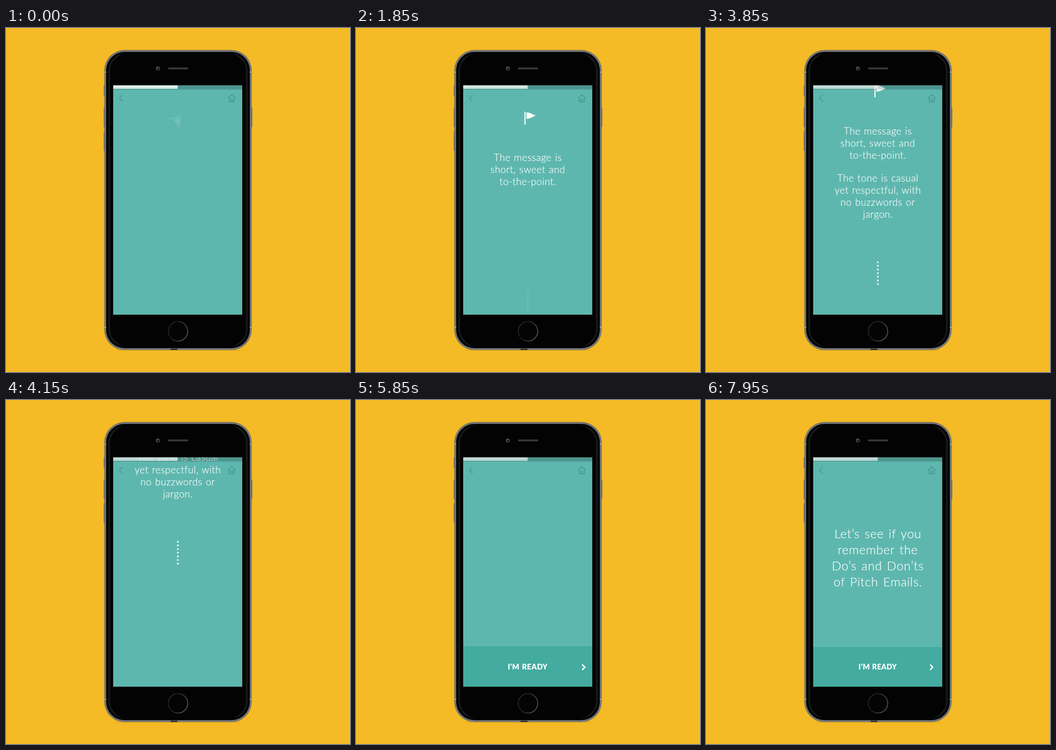
Write an HTML page that moves like this. It is 600 px wide and 600 px high and loops after 8 s.

```html
<!DOCTYPE html>
<html lang="en">
<head>
<meta charset="utf-8">
<title>Lesson screen</title>
<style>
html, body { margin: 0; width: 100%; height: 100%; overflow: hidden; background: #f4bb26; }
svg { display: block; width: 100vw; height: 100vh; }
text { font-family: Lato, "Open Sans", sans-serif; fill: #fff; text-anchor: middle; }
.body, .head { font-weight: 300; stroke: #fff; stroke-width: .2; }
.body { font-size: 17px; letter-spacing: .42px; word-spacing: 1px; }
.head { font-size: 21.5px; letter-spacing: .6px; word-spacing: 2px; }
.label { font-size: 12.5px; font-weight: 900; letter-spacing: .3px; word-spacing: 1px; }
.icon { fill: none; stroke: #43958c; stroke-width: 1.2; }
</style>
</head>
<body>
<svg viewBox="0 0 600 600">
  <defs>
    <clipPath id="screen"><rect x="187" y="100" width="225" height="400"/></clipPath>
    <linearGradient id="ring" x1="0" x2="1" y1="0" y2=".4">
      <stop offset="0" stop-color="#3a3b3c"/>
      <stop offset=".4" stop-color="#1c1d1e"/>
      <stop offset="1" stop-color="#5c5d5f"/>
    </linearGradient>
  </defs>
  <rect width="600" height="600" fill="#f4bb26"/>

  <g id="phone">
    <rect x="192" y="561" width="216" height="1.5" rx=".7" fill="#a87d12" opacity=".3"/>
    <g fill="#77767a">
      <rect x="170.4" y="100" width="2" height="18.5" rx=".8"/>
      <rect x="170.4" y="138.5" width="2" height="34.5" rx=".8"/>
      <rect x="170.4" y="180" width="2" height="34.5" rx=".8"/>
      <rect x="427.6" y="138.5" width="2" height="34.5" rx=".8"/>
    </g>
    <rect x="171.6" y="38.6" width="256.8" height="523" rx="35" fill="#55565a"/>
    <rect x="173.2" y="40.2" width="253.6" height="519.8" rx="33.5" fill="none" stroke="#898a8f" stroke-width="1.3"/>
    <path d="M172 77h3.500M424.500 77h3.500M172 522h3.500M424.500 522h3.500" stroke="#a2a3a8" stroke-width="2"/>
    <rect x="174.900" y="41.900" width="250.200" height="516.400" rx="32" fill="#000"/>
    <rect x="180" y="46" width="240" height="508" rx="28" fill="#030303" stroke="#0f1011" stroke-width="4"/>
    <rect x="180" y="46" width="240" height="508" rx="28" fill="none" stroke="#1c1d1e" stroke-width="1.300"/>
    <rect x="187" y="44" width="226" height="512" rx="24" fill="#030303"/>
    <rect x="287" y="559.500" width="12" height="2" fill="#222"/>
    <circle cx="265" cy="70.500" r="3.600" fill="#4a4b4e"/>
    <circle cx="265.300" cy="70.800" r="2.200" fill="#15171c"/>
    <circle cx="264" cy="69.500" r=".8" fill="#8a8d94"/>
    <rect x="282.500" y="68.700" width="35.500" height="3.600" rx="1.800" fill="#373737"/>
    <circle cx="300" cy="529" r="17" fill="#040404" stroke="url(#ring)" stroke-width="1.300"/>
    <rect x="185" y="98.500" width="229" height="403.500" fill="#0a0b0b"/>
  </g>

  <g clip-path="url(#screen)">
    <rect x="187" y="100" width="225" height="400" fill="#5eb7ae"/>
    <g id="page">
      <g id="flag" fill="#fff">
        <rect x="293.700" y="146" width="2" height="22.500"/>
        <path d="M297.300 147.300C304 147 306.500 150.800 313.300 152.300C309 155.500 304 157.800 297.300 158.700Z"/>
      </g>
      <g id="para1" class="body"></g>
      <g id="para2" class="body"></g>
      <g id="dots" fill="#fff"></g>
    </g>
    <g id="headline" class="head"></g>
    <g id="button">
      <rect x="187" y="431" width="225" height="70" fill="#43aba0"/>
      <text class="label" x="299.500" y="470.300">I’M READY</text>
      <path d="M390.800 461.500l4.600 4.600l-4.600 4.600" fill="none" stroke="#fff" stroke-width="2.200"/>
    </g>
    <path class="icon" d="M203.500 116.800l-5.700 5.600l5.700 5.600"/>
    <path class="icon" d="M387.200 122.600l6.600-6.300l6.600 6.300M389.200 121.200v7.800h9.200v-7.800M392.300 129v-5h3v5"/>
    <rect x="187" y="100" width="225" height="6" opacity=".19"/>
    <rect x="187" y="106" width="225" height="1.500" opacity=".14"/>
    <rect id="bar" x="187" y="100" width="112.500" height="6" fill="#fff"/>
  </g>
</svg>
<script>
const LOOP = 8000, NS = "http://www.w3.org/2000/svg";
const el = id => document.getElementById(id);
const clamp = v => Math.min(1, Math.max(0, v));
const part = (t, start, len) => clamp((t - start) / len);
const easeOut = p => 1 - (1 - p) ** 3;
const sine = p => (1 - Math.cos(Math.PI * p)) / 2;
const decay = (t, start, tau) => Math.exp(-Math.max(0, t - start) / tau);

function add(parent, tag, attrs, text = "") {
  const node = document.createElementNS(NS, tag);
  for (const k in attrs) node.setAttribute(k, attrs[k]);
  node.textContent = text;
  parent.append(node);
}
function lines(id, y, step, rows) {
  rows.forEach((row, i) => add(el(id), "text", { x: 299.7, y: y + i * step }, row));
}
lines("para1", 233, 21.2, ["The message is", "short, sweet and", "to-the-point."]);
lines("para2", 315, 21.2, ["The tone is casual", "yet respectful, with", "no buzzwords or", "jargon."]);
lines("headline", 241, 28, ["Let’s see if you", "remember the", "Do’s and Don’ts", "of Pitch Emails."]);
for (let i = 0; i < 7; i++) add(el("dots"), "circle", { cx: 299.7, cy: 456 + i * 6.33, r: 1.6 });

// Linear interpolation through [time, value] pairs
function track(t, keys) {
  let [t0, v0] = keys[0];
  for (const [t1, v1] of keys) {
    if (t < t1) return v0 + (v1 - v0) * clamp((t - t0) / (t1 - t0));
    [t0, v0] = [t1, v1];
  }
  return v0;
}
function pose(id, opacity, transform) {
  const node = el(id);
  node.setAttribute("opacity", opacity);
  if (transform) node.setAttribute("transform", transform);
}
const zoom = (x, y, s, turn = 0) =>
  `translate(${x} ${y}) rotate(${turn}) scale(${s}) translate(${-x} ${-y})`;

function draw(t) {
  const scroll = 410 * sine(part(t, 3618, 1054));
  pose("page", 1, `translate(0 ${-scroll})`);

  const spin = easeOut(part(t, -40, 850));
  pose("flag", track(t, [[0, .12], [500, 1]]), zoom(294.7, 156.5, .93 + .07 * spin, 90 * (1 - spin)));

  pose("para1", easeOut(part(t, 950, 1000)), `translate(0 ${-10 * decay(t, 1000, 360)})`);
  pose("para2", easeOut(part(t, 1900, 1000)), `translate(0 ${-10 * decay(t, 1900, 270)})`);
  pose("dots", track(t, [[1600, 0], [1850, .12], [2750, .52], [3450, .9]]));

  pose("button", easeOut(part(t, 5480, 350)), zoom(299.5, 466, 1 + .07 * decay(t, 5500, 620)));
  pose("headline", sine(part(t, 5920, 700)), zoom(299.5, 276, 1 + .1 * decay(t, 6000, 560)));

  pose("bar", track(t, [[0, .8], [1850, .75], [2750, .65], [5850, .63]]));
}

const begin = performance.now();
function tick(now) {
  draw(Math.max(0, now - begin) % LOOP);
  requestAnimationFrame(tick);
}
draw(0);
requestAnimationFrame(tick);
</script>
</body>
</html>
```
